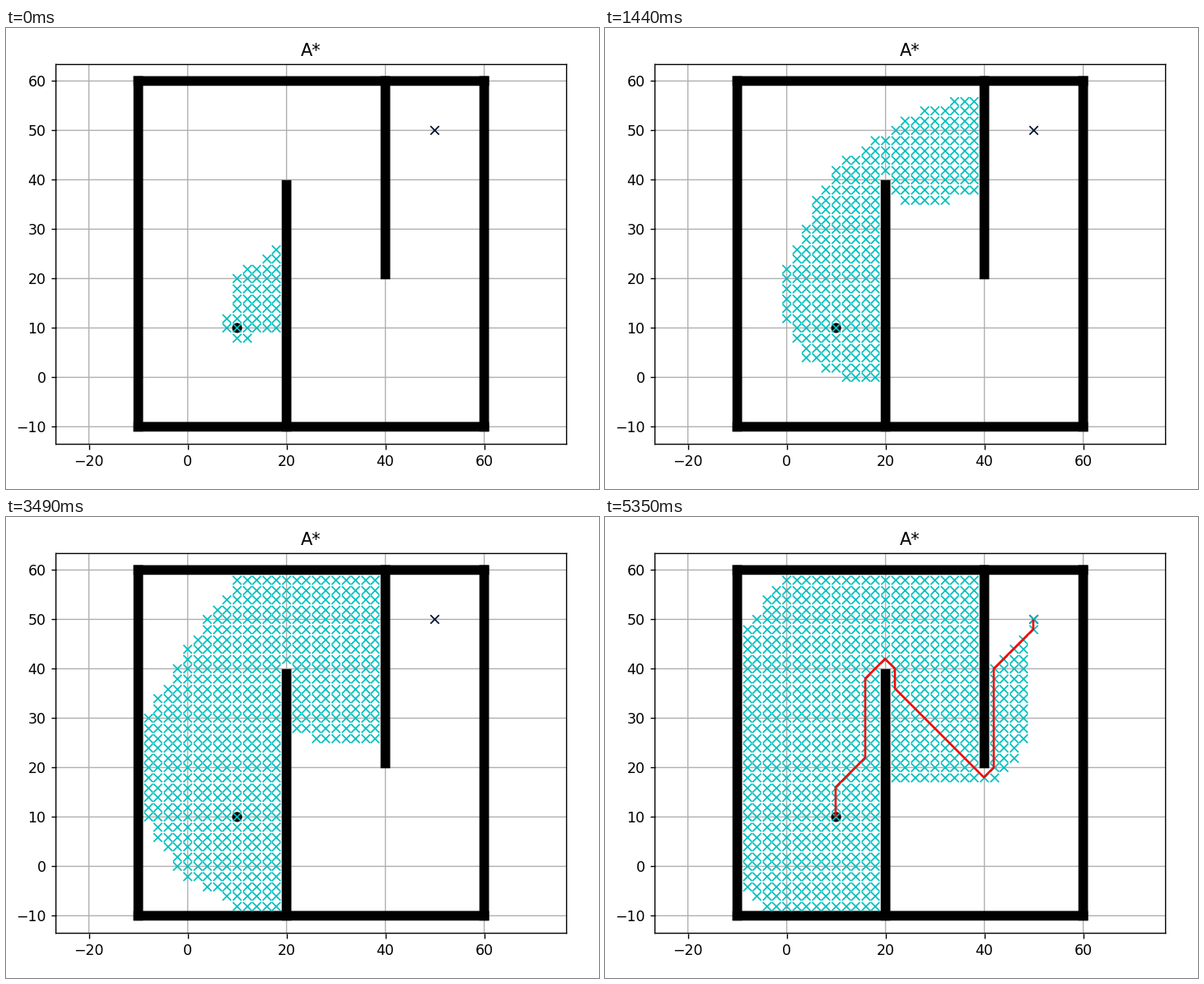
These frames come from a looping animation (720x560 px, 5560 ms). A matplotlib script:

```python
import math

import matplotlib.pyplot as plt
import numpy as np
from matplotlib.animation import FuncAnimation
from matplotlib.patches import Circle

W, H, DPI = 720, 560, 125
LOOP, STEP = 5560, 20
TICK = LOOP / 82
DONE_AT = 5350

# The chart lives on a pixel grid that is shown enlarged
ZOOM = 1.25
COLS, ROWS = W / ZOOM, H / ZOOM
UNIT = 4.8
ARM = 6 / 72 * DPI / ZOOM / 2

CELL = 2
START, GOAL = (5, 5), (25, 25)

# Straight walls as end points in world units
WALLS = [((-10, -10), (60, -10)), ((60, -10), (60, 60)),
         ((60, 60), (-10, 60)), ((-10, 60), (-10, -10)),
         ((20, -10), (20, 39)), ((40, 60), (40, 21))]

ROUTE = [(10, 10), (10, 16), (16, 22), (16, 38), (20, 42), (22, 40),
         (22, 36), (40, 18), (42, 20), (42, 40), (50, 48), (50, 50)]


def to_px(points):
    """World units to grid pixels, counted from the top left."""
    x, y = np.asarray(points, float).T
    return np.column_stack([296 + UNIT * (x - 25), 339.4 - UNIT * y])


def snap(px):
    return np.floor(px + 0.5) + 0.5


def is_blocked(x, y):
    for (x0, y0), (x1, y1) in WALLS:
        near_x = min(x0, x1) - 1 <= x <= max(x0, x1) + 1
        near_y = min(y0, y1) - 1 <= y <= max(y0, y1) + 1
        on_end = x0 == x1 and x == x0 or y0 == y1 and y == y0
        on_side = x0 != x1 and abs(y - y0) <= 1 or y0 != y1 and abs(x - x0) <= 1
        if near_x and near_y and (on_end or on_side):
            return True
    return False


def search():
    """Run A* and return the cells in the order they are visited."""
    moves = [(1, 0), (0, 1), (-1, 0), (0, -1),
             (-1, -1), (-1, 1), (1, -1), (1, 1)]
    cost = {START: 0.0}
    closed, order = set(), []

    def score(c):
        left = math.dist(c, GOAL)
        return round(cost[c] + left, 6), left

    while True:
        cur = min(cost, key=score)
        order.append(cur)
        if cur == GOAL:
            return np.array(order) * CELL
        base = cost.pop(cur)
        closed.add(cur)
        for dx, dy in moves:
            new = (cur[0] + dx, cur[1] + dy)
            if new in closed or is_blocked(new[0] * CELL, new[1] * CELL):
                continue
            total = base + math.hypot(dx, dy)
            if total < cost.get(new, math.inf):
                cost[new] = total


def crosses(points):
    """Outline of one x per point, with gaps between the strokes."""
    gap = np.nan
    strokes = ARM * np.array([(-1, -1), (1, 1), (gap, gap),
                              (-1, 1), (1, -1), (gap, gap)])
    centres = snap(to_px(points))
    return (centres[:, None, :] + strokes).reshape(-1, 2)


def add_line(points, color, lw, **style):
    line, = ax.plot(*np.transpose(points), color=color, lw=lw, snap=False,
                    solid_capstyle=style.pop("cap", "butt"), **style)
    return line


def labels(values):
    return [str(v).replace("-", "\u2212") for v in values]


visited = search()
trail = crosses(visited)
route_px = to_px(ROUTE)

left, right, top, bottom = 48.5, 544.5, 35.5, 404.5
fig = plt.figure(figsize=(W / DPI, H / DPI), dpi=DPI, facecolor="white")
ax = fig.add_axes([left / COLS, 1 - bottom / ROWS,
                   (right - left) / COLS, (bottom - top) / ROWS])
ax.set_xlim(left, right)
ax.set_ylim(bottom, top)
ax.set_title("A*")

xs, ys = range(-20, 61, 20), range(-10, 61, 10)
ax.set_xticks(snap(to_px([(x, 0) for x in xs]))[:, 0], labels(xs))
ax.set_yticks(snap(to_px([(0, y) for y in ys]))[:, 1], labels(ys))
ax.grid(True)
for part in ax.get_xgridlines() + ax.get_ygridlines() + list(ax.spines.values()):
    part.set_snap(False)

for wall in WALLS:
    add_line(snap(to_px(wall)), "k", 6.76, cap="projecting")
ax.add_patch(Circle(snap(to_px([(10, 10)]))[0], 4.86, color="k", lw=0, zorder=2))
add_line(crosses([(50, 50)]), "#001030", 1)
cells = add_line(trail[:0], "c", 1)
route = add_line(route_px[:0], "r", 1.5)


def steps_at(t):
    # Step s is reached at 52 s + 0.4 s^2 ms: drawing slows as the plot fills
    return int((math.sqrt(52 ** 2 + 1.6 * t) - 52) / 0.8 + 0.6)


def draw(i):
    t = i * STEP + STEP / 2
    done = t >= DONE_AT
    steps = min(steps_at(t // TICK * TICK), (len(visited) - 41) // 10)
    count = len(visited) if done else 41 + 10 * steps
    cells.set_data(*trail[:6 * count].T)
    route.set_data(*(route_px if done else route_px[:0]).T)
    return cells, route


anim = FuncAnimation(fig, draw, frames=LOOP // STEP, interval=STEP,
                     repeat=True, repeat_delay=0, blit=False)
plt.show()
```
